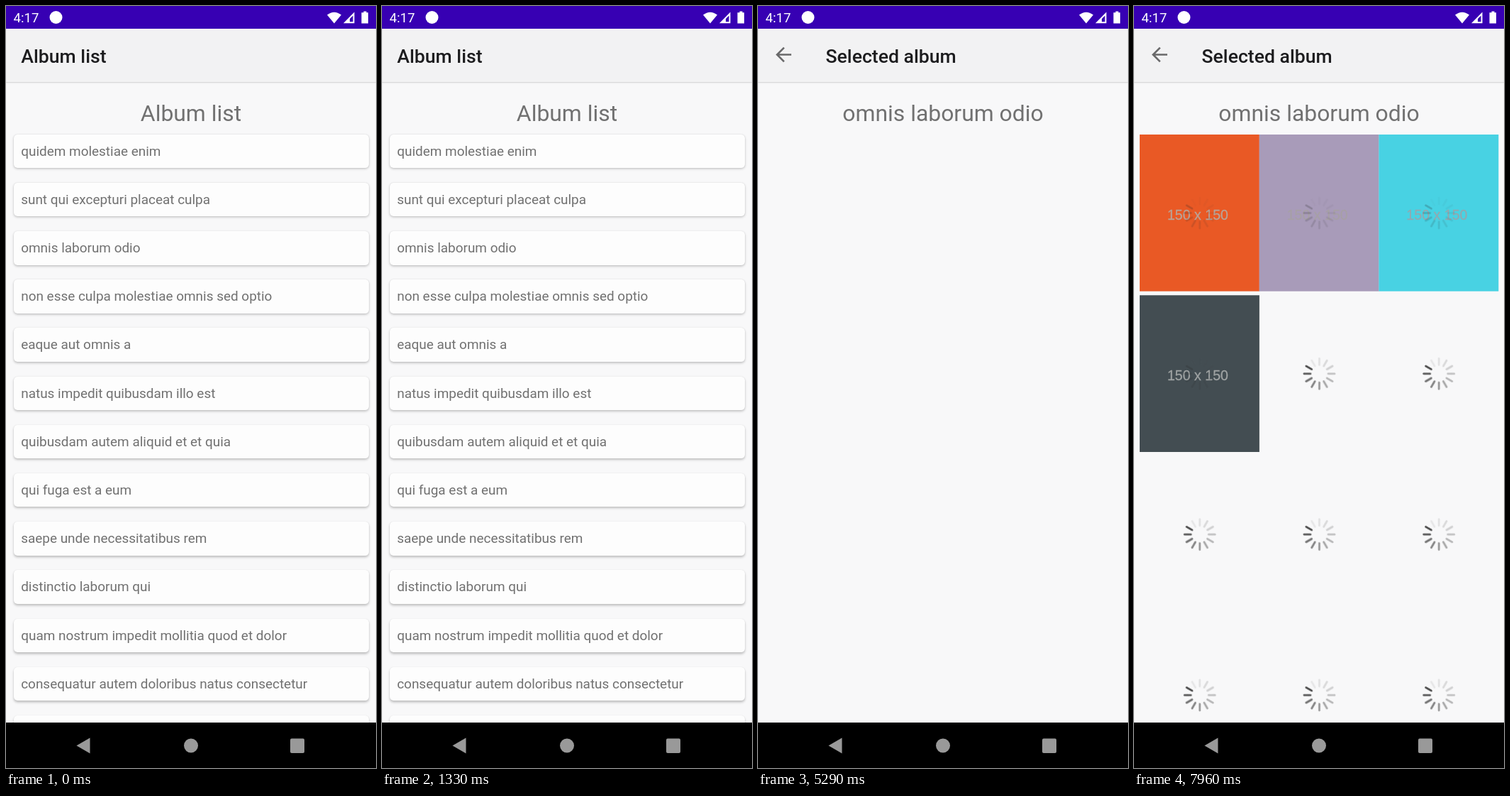
Write an HTML page that moves like this. It is 522x1073 px and loops after 8 s.

```html
<!DOCTYPE html>
<html lang="en">
<head>
<meta charset="utf-8">
<title>Album list</title>
<style>
  html, body { margin: 0; width: 100%; height: 100%; overflow: hidden; background: #000; }
  body { position: relative; font-family: Roboto, sans-serif; }
  svg { position: absolute; left: 0; top: 0; }
  div { position: absolute; box-sizing: border-box; white-space: nowrap; }

  #screen { left: 0; top: 32px; width: 522px; height: 977px; overflow: hidden; }
  .page { inset: 0; background: #f8f8f9; }
  .bar {
    left: 0; top: 0; width: 522px; height: 74.5px; background: #f2f2f3;
    box-shadow: 0 1px 1.5px rgba(0, 0, 0, .17);
  }
  .title { top: 18.5px; line-height: 40px; font-size: 26.6px; font-weight: 500; color: #1c1c1e; }
  .heading {
    left: 0; top: 98.5px; width: 522px; line-height: 40px;
    text-align: center; font-size: 31.9px; color: #717171;
  }
  .card {
    left: 10.5px; width: 501px; height: 47.5px; padding-left: 10.7px; line-height: 47.5px;
    border-radius: 5px; background: #fdfdfd; font-size: 18.95px; color: #717171;
  }
  #grid { left: 0; top: 0; }

  /* One 8 s timeline shared by every moving part */
  #album { animation: open 8s infinite; }
  #grid { animation: load 8s infinite; }
  .photo { animation: show 8s linear infinite; }
  .spin { animation: spin 1s steps(12) infinite; }

  @keyframes open {
    0%, 50.5% { opacity: 0; transform: translateY(78px); animation-timing-function: cubic-bezier(.2, .8, .3, 1); }
    54.9%, 100% { opacity: 1; transform: none; }
  }
  @keyframes load {
    0%, 98.35% { visibility: hidden; }
    98.36%, 100% { visibility: visible; }
  }
  @keyframes show {
    0%, 98.9% { opacity: 0; }
    98.91% { opacity: .5; }
    99.4%, 100% { opacity: 1; }
  }
  @keyframes spin { to { transform: rotate(360deg); } }
</style>
</head>
<body>
<div id="screen">
  <div class="page" id="list">
    <div class="bar"><div class="title" style="left:21.3px">Album list</div></div>
    <div class="heading">Album list</div>
  </div>
  <div class="page" id="album">
    <div class="bar">
      <svg width="60" height="74" fill="none" stroke="#69696a" stroke-width="2.6">
        <path d="M47 36.5H27M36.8 26.6L26.9 36.5l9.9 9.9"/>
      </svg>
      <div class="title" style="left:95.5px">Selected album</div>
    </div>
    <div class="heading">omnis laborum odio</div>
    <svg id="grid" width="522" height="977" viewBox="0 32 522 977">
      <defs><g id="spokes" stroke="#222" stroke-width="2.8" stroke-linecap="round"></g></defs>
    </svg>
  </div>
</div>

<svg width="522" height="1073">
  <path fill="#3700b3" d="M0 0h522v32H0z"/>
  <text x="10.5" y="23" font-size="18.6" fill="#fff">4:17</text>
  <g fill="#fff">
    <circle cx="70.5" cy="16" r="9"/>
    <path d="M453 12.6Q463 5 473 12.6L463 24.5z"/>
    <path d="M476 24.3L491.5 8.5V24.3zM485 22.3h4.5V13.4L485 18z" fill-rule="evenodd"/>
    <path d="M504.500 7.500h4v1.800h2.500v15.200h-9.500V9.300h3z"/>
  </g>
  <path d="M0 1009h522v64H0z"/>
  <g fill="#999">
    <path d="M99.500 1041.500L118.500 1030.500V1052.500z"/>
    <circle cx="261" cy="1041.500" r="10"/>
    <rect x="401" y="1031.500" width="20" height="20.500" rx="2"/>
  </g>
</svg>

<script>
  const albums = [
    "quidem molestiae enim", "sunt qui excepturi placeat culpa", "omnis laborum odio",
    "non esse culpa molestiae omnis sed optio", "eaque aut omnis a",
    "natus impedit quibusdam illo est", "quibusdam autem aliquid et et quia",
    "qui fuga est a eum", "saepe unde necessitatibus rem", "distinctio laborum qui",
    "quam nostrum impedit mollitia quod et dolor",
    "consequatur autem doloribus natus consectetur", ""
  ];
  // fill, label colour
  const photos = [
    ["#e95925", "#b9a398"], ["#a89bb9", "#a7a0a6"],
    ["#48d2e3", "#92a9b0"], ["#434d52", "#a0a4a4"]
  ];

  const add = (parent, tag, attrs, text = "") => {
    const el = document.createElementNS("http://www.w3.org/2000/svg", tag);
    for (const key in attrs) el.setAttribute(key, attrs[key]);
    el.textContent = text;
    return parent.appendChild(el);
  };

  // Shadows drop further the lower a card sits
  albums.forEach((name, i) => {
    const card = document.createElement("div");
    card.className = "card";
    card.textContent = name;
    card.style.top = 148.7 + i * 68.18 + "px";
    card.style.boxShadow =
      `0 ${1.2 + i * 0.12}px 3.5px rgba(0,0,0,.23), 0 0 1px rgba(0,0,0,.12)`;
    list.append(card);
  });

  for (let i = 0; i < 12; i++) {
    add(spokes, "path", {
      d: "M0-12.5V-21.5",
      transform: `rotate(${i * 30})`,
      opacity: 0.08 + 0.74 * (i / 11) ** 1.5
    });
  }

  const spinner = (x, y, opacity) => {
    const spot = add(grid, "g", { transform: `translate(${x} ${y})`, opacity });
    add(add(spot, "g", { class: "spin" }), "use", { href: "#spokes" });
  };

  for (let i = 0; i < 12; i++) {
    const x = 8 + (i % 3) * 168.7;
    const y = 181 + Math.floor(i / 3) * 226.3;
    const cx = x + 84.8, cy = y + 110.5;
    spinner(cx, cy, 1);
    if (!photos[i]) continue;
    const [fill, ink] = photos[i];
    const photo = add(grid, "g", { class: "photo" });
    add(photo, "rect", { x, y, width: 168.9, height: 220.7, fill });
    add(photo, "text", {
      x: cx - 2.8, y: y + 120, fill: ink, "font-size": 19.6,
      "text-anchor": "middle", "font-family": "Liberation Sans, Arial, sans-serif",
      stroke: ink, "stroke-width": 0.3
    }, "150 x 150");
    const ghost = add(photo, "g", { transform: `translate(${cx} ${cy})`, opacity: 0.28 });
    add(add(ghost, "g", { class: "spin" }), "use", { href: "#spokes" });
  }
</script>
</body>
</html>
```
